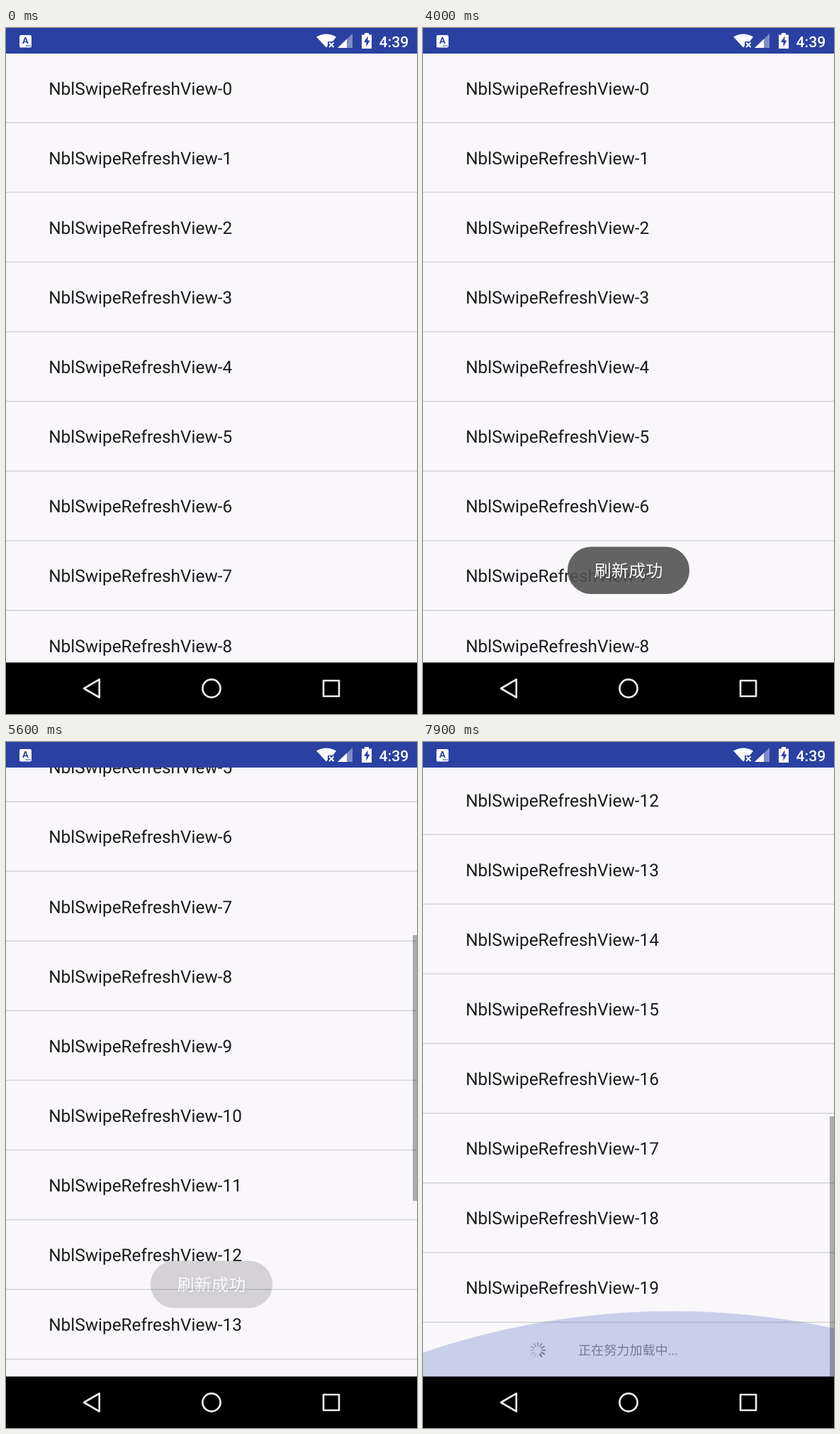
An HTML page for the animation above (8000 ms loop, 580 by 966 pixels).

```html
<!DOCTYPE html>
<html lang="en">
<head>
<meta charset="utf-8">
<title>Swipe refresh list</title>
<style>
  html, body { margin: 0; width: 100%; height: 100%; overflow: hidden; background: #f9f7fa; }
  svg { display: block; width: 100%; height: 100%; font-family: Roboto, "Noto Sans CJK SC", "Noto Sans CJK", sans-serif; text-rendering: geometricPrecision; }
  #rows text { font-size: 24.4px; fill: #1b1b1d; }
  #rows rect { fill: #d3d2d5; }
  .nav { fill: none; stroke: #ececec; stroke-width: 2.7; stroke-linejoin: round; }
</style>
</head>
<body>
<svg viewBox="0 0 580 966">
  <defs>
    <clipPath id="view"><rect y="36" width="580" height="858"/></clipPath>
    <filter id="lift" x="-30%" y="-30%" width="160%" height="160%">
      <feDropShadow dx="0" dy="1.5" stdDeviation="1.8" flood-color="#000" flood-opacity=".24"/>
    </filter>
    <filter id="textShade"><feDropShadow dx="0" dy="1" stdDeviation="1.2" flood-color="#000" flood-opacity=".6"/></filter>
  </defs>

  <rect width="580" height="966" fill="#f9f7fa"/>

  <g clip-path="url(#view)">
    <g id="rows"></g>
    <g id="footer">
      <g id="spokes" stroke="#66666c" stroke-width="1.7" stroke-linecap="round"></g>
      <text x="219" y="45" font-size="18.1" fill="#86868b">正在努力加载中...</text>
    </g>
    <ellipse id="glow" cx="352" rx="1091" fill="#3f58b2"/>
    <rect id="bar" x="574" width="6" fill="#000" fill-opacity=".31"/>
    <g id="wheel">
      <circle r="30" fill="#faf9fc" filter="url(#lift)"/>
      <circle id="arc" r="13.3" pathLength="360" fill="none" stroke="#7f7f81" stroke-width="3.8"/>
    </g>
  </g>

  <rect width="580" height="36" fill="#2a41a2"/>
  <g fill="#fff">
    <rect x="19" y="10" width="17" height="17.5" rx="2"/>
    <path d="M438 12.5Q452 4.5 466 12.5L461 19H454V25L452 27.5Z"/>
    <path d="M456 20.5L462.5 27M462.5 20.5L456 27" stroke="#fff" stroke-width="1.9"/>
    <path d="M489 8V28H468Z" opacity=".4"/>
    <path d="M481 15.6V28H468Z"/>
    <path d="M506 7h6v2.5h4V29h-14V9.5h4z"/>
    <text x="526.5" y="26.5" font-size="21.2" font-weight="500">4:39</text>
  </g>
  <path d="M510.5 11.5L505 20H508.5V26.5L513.5 17.5H510.5Z" fill="#2a41a2"/>
  <text x="27.5" y="22.3" font-size="13" font-weight="700" text-anchor="middle" fill="#2a41a2">A</text>
  <path d="M28 25h1.5m1 0h1.5m1 0h1.5" stroke="#2a41a2" stroke-width="1.3"/>

  <rect y="893.5" width="580" height="72.5" fill="#000"/>
  <path class="nav" d="M110 930L131.700 917.300V942.700Z"/>
  <circle class="nav" cx="290" cy="930" r="12.6"/>
  <rect class="nav" x="448" y="919" width="22" height="22"/>

  <g id="toast">
    <rect x="204" y="730.5" width="172" height="66.5" rx="33" fill="#525153" fill-opacity=".89"/>
    <text x="290" y="772.5" font-size="24.2" text-anchor="middle" fill="#f6f6f6" filter="url(#textShade)">刷新成功</text>
  </g>
</svg>

<script>
const LOOP = 8000, STEP = 100;
const ROW = 98.125, COUNT = 20, TOP = 36, BOTTOM = 893.5;
const SPIN = 1332, SPIN_START = 1079, MAX_SWEEP = 288;

// Three upward swipes: start, end, distance
const swipes = [[4400, 5100, 452.6], [5300, 6200, 336.9], [6300, 6983, 391]];

const $ = id => document.getElementById(id);
const clamp = x => Math.min(1, Math.max(0, x));
const ramp = (t, from, to) => clamp((t - from) / (to - from));
const smooth = x => (x = clamp(x), x * x * (3 - 2 * x));
const slowDown = x => 1 - (1 - x) ** 3;

function set(el, attrs) {
  for (const key in attrs) el.setAttribute(key, attrs[key]);
}

function add(parent, tag, attrs, text = "") {
  const el = document.createElementNS("http://www.w3.org/2000/svg", tag);
  set(el, attrs);
  el.textContent = text;
  parent.append(el);
  return el;
}

for (let i = 0; i < COUNT; i++) {
  add($("rows"), "text", { x: 60.2, y: 93.6 + i * ROW }, "NblSwipeRefreshView-" + i);
  add($("rows"), "rect", { y: 132.5 + i * ROW, width: 580, height: 1.5 });
}

const spokes = Array.from({ length: 12 }, (_, i) =>
  add($("spokes"), "path", { d: "M6 0H10.5", transform: `translate(162 38.5) rotate(${i * 30})` }));

// Pulled down, released, spun, then shrunk away
function drawWheel(t) {
  const pull = ramp(t, 100, 900), release = ramp(t, 1000, 1200);
  const y = 171 * smooth(pull) - 69 * slowDown(release);
  const size = ramp(t, 100, 150) - ramp(t, 3300, 3450);

  let sweep = MAX_SWEEP * (pull - .93 * release), turn = sweep / 2 - 90;
  if (release === 1) {
    const cycles = (t - SPIN_START) / SPIN, n = Math.floor(cycles), p = cycles - n;
    const head = MAX_SWEEP * smooth(p * 2), tail = MAX_SWEEP * smooth(p * 2 - 1);
    sweep = Math.max(8, head - tail);
    turn = n * MAX_SWEEP + tail + cycles * 234 - 81;
  }
  set($("wheel"), {
    transform: `translate(290 ${y}) scale(${size})`,
    visibility: size > 0 ? "visible" : "hidden"
  });
  set($("arc"), { "stroke-dasharray": `${sweep} 360`, transform: `rotate(${turn})` });
}

function drawList(t) {
  const offset = swipes.reduce((sum, [from, to, way]) => sum + way * smooth(ramp(t, from, to)), 0);
  set($("rows"), { transform: `translate(0 ${-offset})` });
  set($("footer"), { transform: `translate(0 ${TOP + COUNT * ROW - offset})` });

  // The thumb slows once the footer comes into view
  const barY = TOP + Math.min(offset * .4367, 485 + (offset - 1111) * .088);
  set($("bar"), {
    y: barY, height: Math.min(374.5, BOTTOM - barY),
    visibility: offset > 0 ? "visible" : "hidden"
  });

  // The glow is one large circle flattened from the bottom edge
  const grow = slowDown(ramp(t, 6700, 7570)), ry = 1091 * grow;
  set($("glow"), { cy: BOTTOM - 92 * grow + ry, ry, opacity: .31 - .06 * ramp(t, 6800, 7300) });

  spokes.forEach((el, i) => set(el, { opacity: 1 - (t / STEP + 43 - i) % 12 * .075 }));
}

function draw(now) {
  const t = Math.floor(now % LOOP / STEP) * STEP;
  drawList(t);
  drawWheel(t);
  set($("toast"), { opacity: ramp(t, 3500, 3950) - ramp(t, 5300, 5700) });
}

const begin = performance.now();
function tick() {
  draw(performance.now() - begin);
  requestAnimationFrame(tick);
}
tick();
</script>
</body>
</html>
```
